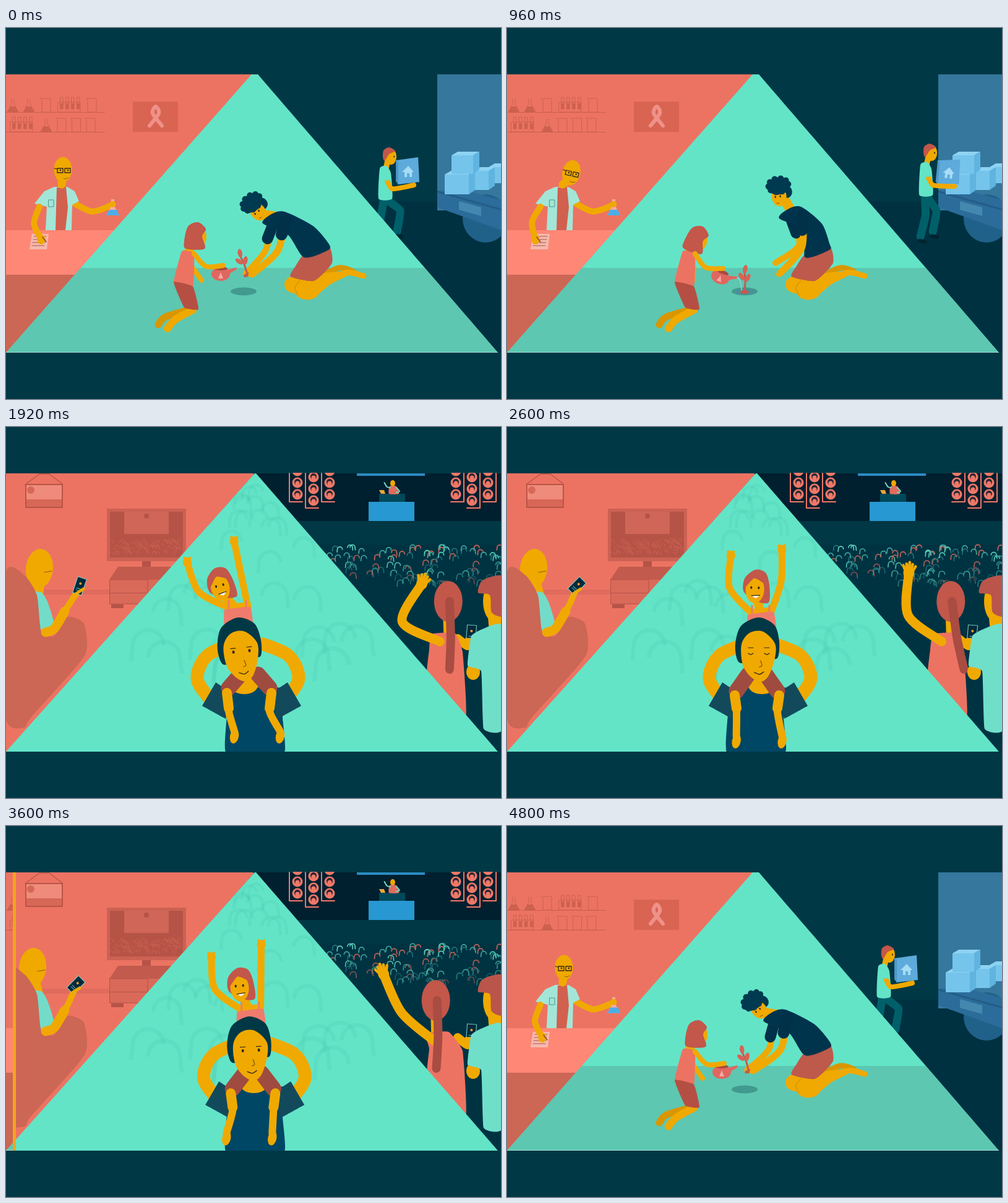
Write an HTML page with a canvas that moves like this. It is 800 px wide and 600 px high and loops after 4.84 s.

```html
<!DOCTYPE html>
<html lang="en">
<head>
<meta charset="utf-8">
<title>Two sides</title>
<style>
html, body { margin: 0; width: 100%; height: 100%; overflow: hidden; background: #003845; }
canvas { display: block; }
</style>
</head>
<body>
<canvas id="stage" width="800" height="600"></canvas>
<script>
const c = document.getElementById('stage').getContext('2d');
const LOOP = 4840, TURN = Math.PI * 2;
const SKIN = '#f0a900', SHADE = '#d99600', NIGHT = '#003845', CORAL = '#ec7362', ROSE = '#cc6655',
  HAIR = '#c2574a', MINT = '#63e4c7', INK = '#33291f', LINE = '#cd604f', NAVY = '#003148', CURLS = '#003a50';

// Timing
const mix = (a, b, u) => a + (b - a) * u;
function smooth(t, from, to) {
  const u = Math.max(0, Math.min(1, (t - from) / (to - from)));
  return u * u * (3 - 2 * u);
}
function random(seed) {
  return () => (seed = (seed * 16807) % 2147483647) / 2147483647;
}

// Drawing: points are flat x, y lists, k sets how round the curve is
function trace(p, closed, k) {
  const n = p.length / 2;
  const at = i => {
    i = closed ? (i + n) % n : Math.max(0, Math.min(n - 1, i));
    return [p[2 * i], p[2 * i + 1]];
  };
  c.beginPath();
  c.moveTo(p[0], p[1]);
  for (let i = 0; i < (closed ? n : n - 1); i++) {
    const [a, b, d, e] = [at(i - 1), at(i), at(i + 1), at(i + 2)];
    c.bezierCurveTo(b[0] + (d[0] - a[0]) * k, b[1] + (d[1] - a[1]) * k,
      d[0] - (e[0] - b[0]) * k, d[1] - (e[1] - b[1]) * k, d[0], d[1]);
  }
  if (closed) c.closePath();
}
function fill(color, p, k = 0) { trace(p, true, k); c.fillStyle = color; c.fill(); }
function line(color, w, p, k = 0.15) {
  trace(p, false, k);
  c.strokeStyle = color; c.lineWidth = w; c.lineCap = c.lineJoin = 'round';
  c.stroke();
}
function rect(color, x, y, w, h) { c.fillStyle = color; c.fillRect(x, y, w, h); }
function frame(color, x, y, w, h, lw = 1) { c.strokeStyle = color; c.lineWidth = lw; c.strokeRect(x, y, w, h); }
function ell(color, x, y, rx, ry = rx, r = 0) {
  c.beginPath(); c.ellipse(x, y, rx, ry, r, 0, TURN); c.fillStyle = color; c.fill();
}
function place(x, y, r, draw) { c.save(); c.translate(x, y); c.rotate(r); draw(); c.restore(); }
function mirror(x, draw) {
  for (const side of [1, -1]) { c.save(); c.translate(x, 0); c.scale(side, 1); draw(side); c.restore(); }
}
function clip(p, draw) { c.save(); trace(p, true, 0); c.clip(); draw(); c.restore(); }
function hook(color, w, x, y, r, side) {
  c.beginPath();
  c.arc(x, y, r, Math.PI, TURN);
  c.moveTo(x + side * r, y); c.lineTo(x + side * r * 1.1, y + r);
  c.strokeStyle = color; c.lineWidth = w; c.stroke();
}
// Arm of fixed length: the elbow bends out to one side as the hand comes nearer.
function arm(w, ax, ay, bx, by, length, side) {
  const dx = bx - ax, dy = by - ay, d = Math.hypot(dx, dy);
  const h = side * Math.sqrt(Math.max(0, length * length - d * d)) / 2 / d;
  const ex = (ax + bx) / 2 - dy * h, ey = (ay + by) / 2 + dx * h;
  line(SKIN, w, [ax, ay, ex, ey, bx, by]);
  return [ex, ey];
}

const LEFT = [0, 73, 404, 73, 0, 527], RIGHT = [402, 73, 800, 73, 800, 525, 793, 525];
const triangle = (color, x0, x1) => fill(color, [x0, 75, x1, 75, 795, 525, 0, 525]);

// ---------- Lab, planting, loading ----------

function flask(x, y) {
  line(LINE, 1, [x - 2, y - 21, x - 2, y - 13, x - 9, y, x + 9, y, x + 2, y - 13, x + 2, y - 21], 0);
  fill(LINE, [x - 9, y, x - 4, y - 9, x + 4, y - 9, x + 9, y]);
}
function beaker(x, y) {
  line(LINE, 1, [x - 9, y - 22, x - 7, y - 19, x - 7, y, x + 7, y, x + 7, y - 22, x - 9, y - 22], 0);
}
function rack(x, y) {
  for (let i = 0; i < 4; i++) {
    frame(LINE, x + i * 9, y - 24, 4, 19);
    rect(LINE, x + i * 9, y - 14, 4, 9);
  }
  frame(LINE, x - 4, y - 16, 36, 16);
}

function lab(t) {
  rect(CORAL, 0, 75, 400, 255);
  for (const y of [136, 168]) rect(LINE, 0, y, 160, 1);
  flask(11, 136); flask(37, 136); beaker(65, 136); rack(88, 136); beaker(139, 136);
  rack(11, 168); flask(65, 168);
  for (let i = 0; i < 3; i++) beaker(90 + i * 23.5, 168);
  rect('#d96452', 205, 119, 73, 49);
  line('#ef9189', 6, [232, 158, 247, 138, 242, 127, 237, 138, 252, 158]);

  rect('#ff8775', 0, 327, 400, 72);
  rect(ROSE, 0, 399, 400, 126);
  fill('#f5b9ad', [42, 333, 69, 333, 66, 358, 38, 358]);
  for (let i = 0; i < 4; i++) line('#a85248', 1, [45 - i, 337 + i * 5, 65 - i, 337 + i * 5]);

  const lower = smooth(t, -600, 0), look = smooth(t, 100, 960);
  const hx = 92 + 12 * look, hy = 229 + 5 * look;
  const lx = 60 - 3 * lower - 11 * look, ly = 342;
  const rx = mix(179, 172, lower), ry = mix(259, 286, lower);
  arm(10, 108, 282, rx, ry, 69, 1);
  fill('#a3e6d7', [78, 257, 62, 264, 46, 284, 66, 289, 64, 327, 106, 327, 107, 286, 118, 280, 111, 264, 99, 257]);
  fill('#d2604f', [82, 258, 97, 257, 100, 290, 96, 327, 80, 327]);
  frame('#4f948b', 69, 278, 8, 11);
  line(SKIN, 13, [90, 253, hx, hy + 8]);
  place(hx, hy, 0.22 * look, () => {
    ell(SKIN, 0, 0, 14.5, 20.5);
    for (const x of [-9, 3]) { frame(INK, x, -2, 9, 7, 1.3); ell(INK, x + 5, 1, 1.3); }
    line(INK, 1.2, [-14, -2, -9, -1]);
    line('#8a5b10', 1, [1, 14, 5, 15, 9, 13]);
  });
  place(rx, ry, -0.8 * (1 - lower), () => {
    fill('#f6aaa0', [-2, -9, 3, -9, 3, 2, 11, 17, -10, 17, -2, 2]);
    fill('#4aaeea', [-5, 8, 7, 8, 11, 17, -10, 17]);
  });
  ell(SKIN, rx, ry - 1, 5.5, 5);
  arm(10, 54, 289, lx, ly, 57, 1);
  ell(SKIN, lx, ly, 6.5, 8);
  line('#8e433b', 1.5, [lx + 2, ly - 4, lx + 8, ly + 4]);
}

function girlWatering(t) {
  const lift = smooth(t, -600, -40), pour = smooth(t, 400, 960);
  const hx = 295 + 11 * lift, hy = 337 + 5 * pour, sx = 280 + 4 * lift, wx = 267 + 4 * lift;
  const kx = mix(334, 347, lift) - 2 * pour, ky = mix(411, 397, lift) + 5 * pour;
  line(SHADE, 11, [302, 454, 258, 467, 246, 480]);
  line(SKIN, 12, [302, 456, 273, 472, 261, 486]);
  line(SKIN, 8, [sx + 18, 388, mix(sx + 32, sx + 16, pour), 408]);
  line(SKIN, 14, [sx + 10, 364, hx - 5, hy + 10]);
  fill(CORAL, [sx, 361, sx + 20, 364, wx + 31, 418, wx, 412], 0.05);
  fill('#b54f43', [wx, 411, wx + 31, 418, 311, 455, 288, 452], 0.06);
  place(hx, hy, 0.3 * pour, () => {
    ell(SKIN, 10, 1, 8, 14);
    fill(HAIR, [-18, 8, -12, -16, 4, -23, 17, -12, 11, 0, 15, 20, -15, 20], 0.15);
  });
  place(kx, ky, 0.38 * pour, () => {
    fill('#df6760', [10, 3, 26, -7, 25, -10, 8, -5]);
    ell('#df6760', 0, 1, 15, 11);
    ell('#a94840', 0, -8, 11, 3);
    fill('#f6aaa5', [-4, 8, 0, -2, 4, 8]);
  });
  arm(8, sx + 20, 365, kx + 4, ky - 13, 56, 1);
}

function planter(t) {
  const plant = smooth(t, -450, 600), rise = smooth(t, 500, 960);
  const dip = smooth(t, 0, 450) * (1 - rise);
  const px = mix(395, 384, plant), py = mix(382, 428, plant);
  const nx = mix(440, 465, rise) - 6 * dip, ny = mix(302, 294, rise) + 8 * dip;
  const angle = mix(-1.17, -0.62, rise), hx = nx + 45 * Math.sin(angle), hy = ny - 45 * Math.cos(angle);
  const fx = mix(px - 3, 434, rise), fy = mix(py - 3, 380, rise);
  const gx = mix(px + 7, 441, rise), gy = mix(py - 2, 397, rise);

  ell('#429a8f', 384, 426, 21, 6.5);
  if (t > 640) {
    ell('#4b8f9d', 384, 427, 15, 4);
    line('#8fd5dc', 1.5, [371, 403, 377, 409, 379, 424]);
  }
  line(SHADE, 9, [505, 403, 538, 388, 560, 393]);
  line(SKIN, 9, [505, 418, 548, 396, 578, 401]);
  fill(SKIN, [480, 404, 535, 394, 552, 400, 525, 414, 492, 438], 0.1);
  ell(SKIN, 467, 415, 17, 14);
  ell(SKIN, 487, 423, 21, 16.5);
  line(SHADE, 1.5, [472, 432, 467, 420, 475, 408]);
  fill('#bd5a4c', [482, 366, 521, 352, 527, 380, 498, 409, 460, 402, 468, 385], 0.1);

  const [ex, ey] = arm(10, nx - 10, ny + 10, fx, fy, 98, -1);
  line(NAVY, 18, [nx - 7, ny + 12, mix(nx - 10, ex, 0.7), mix(ny + 10, ey, 0.6)]);
  line(SKIN, 16, [nx - 5, ny + 3, hx + 7, hy + 16]);
  fill('#00344d', [nx - 25, ny + 14, nx - 11, ny - 1, nx + 10, ny - 5, (nx + 520) / 2 + 16, (ny + 352) / 2 - 7,
    521, 348, 521, 359, 482, 371, nx + 16, ny + 33], 0.13);
  place(px, py, -0.38 * Math.sin(Math.PI * plant), () => {
    line('#c65a4c', 3, [0, 0, 1, -20, -1, -40]);
    for (const [x, y, r] of [[1, -38, 0.2], [-5, -26, -0.6], [5, -24, 0.5]]) ell('#d66455', x, y, 3.6, 7, r);
    ell('#c65a4c', 0, -1, 7, 3);
  });
  const [kx, ky] = arm(11, nx + 12, ny + 5, gx, gy, 111, -1);
  ell(SKIN, gx, gy, 7, 4, -0.5);
  line(NAVY, 19, [nx + 13, ny + 8, mix(nx + 12, kx, 0.5), mix(ny + 5, ky, 0.5)]);
  place(hx, hy, angle + 0.5, () => {
    ell(CURLS, 12, 9, 9, 10);
    ell(SKIN, -1, 15, 12, 16);
    ell(CURLS, 0, -2, 19, 14);
    for (let a = 0; a < TURN; a += 0.63) ell(CURLS, 16 * Math.cos(a), 11 * Math.sin(a) - 3, 5);
    for (const x of [-7, 1]) ell(INK, x, 15, 1.2, 1.8);
    line('#8a5b10', 1, [-6, 25, -2, 26]);
  });
}

function cube(x, y, w, h) {
  const d = 10;
  fill('#8ed3f2', [x, y, x + d, y - 6, x + w + d, y - 6, x + w, y]);
  fill('#5fb4e0', [x + w, y, x + w + d, y - 6, x + w + d, y + h - 7, x + w, y + h]);
  rect('#75c4ec', x, y, w, h);
}

function loading(t) {
  rect(NIGHT, 400, 75, 400, 450);
  rect('#003141', 400, 281, 400, 244);
  rect('#35779d', 697, 75, 103, 220);
  ell('#20618a', 775, 308, 37, 39);
  fill('#2b6c9a', [697, 263, 740, 262, 800, 278, 800, 327, 697, 290]);
  fill('#235c86', [697, 263, 800, 292, 800, 295, 697, 266]);
  fill('#4488b0', [732, 280, 768, 290, 768, 304, 732, 294]);
  cube(780, 225, 24, 26); cube(756, 231, 24, 31); cube(709, 237, 39, 32); cube(720, 206, 35, 30);

  // Walks to the truck, then leans in to put the box down.
  const walk = Math.min(t, 600), set = smooth(t, 500, 960);
  const stride = Math.cos(walk / 190) * mix(1, 0.55, set);
  const bx = 30, by = 25 + 8 * set;
  place(619 + walk * 0.102 + 3 * set, 207 - 6 * set, 0, () => {
    for (const s of [-stride, stride]) {
      const up = Math.max(0, s) * 14;
      line('#00606a', 13, [-8, 68, 2 + s * 16, 102 - up, -5 + s * 18, 136 - up], 0.06);
      line('#00252f', 6, [-6 + s * 18, 143 - up, 2 + s * 18, 145 - up]);
    }
    line(SKIN, 9, [-5, 20, -2, 6]);
    fill(MINT, [-15, 20, -4, 16, 3, 28, 5, 69, -17, 69], 0.08);
    ell(SKIN, 3, 1, 9, 13);
    fill(HAIR, [-10, 2, -9, -9, 0, -14, 10, -8, 0, -3, -7, 8], 0.12);
    ell(INK, 8, 1, 1, 1.4);
    place(bx, by, 0.1 * set, () => {
      fill('#5daadb', [-19, -18, 17, -23, 19, 17, -16, 21]);
      fill('#4d97c8', [-19, -18, -15, -15, -15, 21, -19, 16]);
      fill('#a6dcf5', [-9, 1, 1, -9, 10, 1, 7, 1, 7, 9, -5, 9, -5, 1]);
      rect('#5daadb', -1, 3, 4, 6);
    });
    line(SKIN, 8, [-6, 32, 5, 53, bx + 10, by + 22], 0.1);
    line(MINT, 12, [-8, 26, -4, 34]);
  });
}

function sceneOne(t) {
  clip(LEFT, () => lab(t));
  clip(RIGHT, () => loading(t));
  triangle(MINT, 397, 407);
  clip([0, 388, 800, 388, 800, 525, 0, 525], () => triangle('#5dc7b1', 397, 407));
  rect('#9fe0d2', 0, 524, 795, 1);
  planter(t);
  girlWatering(t);
}

// ---------- Sofa, shoulders, concert ----------

function phone(x, y, r) {
  place(x, y, r, () => {
    rect('#7fd8cf', -8, -14, 16, 28);
    rect('#042a3a', -7, -13, 14, 26);
    ell('#f0a030', 0, -4, 2);
    for (const line of [4, 7]) rect('#69bcc4', -4, line, 8, 1);
  });
}

function livingRoom(t) {
  rect(CORAL, 0, 75, 400, 450);
  line('#b95447', 1.3, [31, 93, 54, 76, 70, 76, 91, 92], 0);
  rect('#ef8b7b', 32, 94, 59, 36);
  ell('#d76757', 40, 102, 6);
  rect('#d76757', 33, 117, 58, 12);
  frame('#b95447', 32, 93, 59, 37, 2);
  rect('#df6c5c', 45, 263, 165, 8);

  rect('#cc6253', 163, 132, 128, 85);
  rect('#b65347', 168, 137, 118, 74);
  rect('#d06657', 191, 137, 72, 36);
  ell('#b65347', 227, 144, 4);
  const rnd = random(31);
  for (let i = 0; i < 80; i++) hook('#c65f51', 1, 170 + rnd() * 114, 183 + rnd() * 24, 2.5, 1);
  rect('#b65347', 220, 217, 14, 16);
  rect('#b65347', 209, 232, 34, 5);
  fill('#c25b4d', [167, 247, 181, 226, 268, 226, 250, 247]);
  rect('#d96a59', 167, 247, 83, 40);
  frame('#b65347', 168, 247, 61, 39);
  rect('#b65347', 168, 268, 61, 1);
  rect('#b65347', 170, 287, 20, 6);

  const look = smooth(t, 1920, 2600), hx = 54 - 11 * look, hy = 229;
  const px = 119 - 6 * look, py = 257;
  line(SKIN, 24, [hx - 3, hy + 12, 48, 272]);
  ell(SKIN, hx, hy, 22, 32, 0.1);
  line('#8a5b10', 1.2, [hx + 8, hy + 6, hx + 20, hy + 4]);
  fill('#72dcc8', [44, 270, 58, 268, 68, 285, 78, 322, 58, 332], 0.1);
  fill(ROSE, [0, 236, 30, 240, 50, 272, 57, 332, 78, 338, 100, 307, 126, 318, 127, 370, 40, 470, 30, 486, 0, 470], 0.1);
  line(SKIN, 15, [64, 332, 78, 326, 95, 298]);
  line(SKIN, 10, [78, 326, 98, 293, px - 2, py + 7]);
  phone(px, py, 0.32 + 0.46 * look);
  line(SKIN, 5, [px - 5, py + 12, px + 6, py + 5]);
}

function speakers(x) {
  mirror(x, () => {
    for (let i = 0; i < 3; i++) {
      const cx = -154 + i * 26 + 0, low = i === 1 ? 10 : 0;
      line('#ef7868', 2, [cx - 13, 75, cx - 13, 121 + low, cx + 8, 121 + low], 0);
      for (let j = 0; j < 3; j++) {
        const cy = 71 + low + j * 19;
        ell('#ef7868', cx, cy, 8.5);
        ell('#2b2733', cx, cy - 1, 5);
        ell('#ef7868', cx, cy + 1, 3.5);
      }
    }
  });
}

function concert(t) {
  rect('#001f2f', 400, 75, 400, 78);
  rect(NIGHT, 400, 152, 400, 40);
  rect('#003342', 400, 190, 400, 335);
  rect('#2c8cc4', 567, 75, 110, 4);
  speakers(625);
  rect('#2898d2', 586, 121, 74, 31);
  rect('#00495a', 603, 108, 42, 13);
  fill('#e6a63a', [603, 102, 611, 102, 613, 108, 606, 108]);
  fill('#df6c5d', [620, 96, 631, 96, 635, 108, 619, 108], 0.1);
  ell(SKIN, 625, 91, 4, 5);
  line('#70d9c5', 2, [621, 98, 616, 97, 613 + 3 * Math.sin(t / 160), 90]);
  line('#70d9c5', 2, [631, 98, 636, 104, 631, 106]);

  const rnd = random(77), tones = ['#5bcfba', '#41a99e', '#c9665a', '#23747a'];
  for (let i = 0; i < 105; i++) {
    const depth = rnd(), bob = Math.sin(t / 130 + i * 2);
    c.globalAlpha = 1 - 0.6 * depth * depth;
    hook(tones[i % 4], 1.7, 520 + rnd() * 280, 194 + depth * 60 + bob, 4 + depth, i % 3 ? -1 : 1);
  }
  c.globalAlpha = 1;

  // One slow swing moves head, hand and ponytail, each a little later than the other.
  const swing = (t - 1920) / 3300 * TURN;
  const hx = 705 + 14 * Math.cos(swing - 0.8), hy = 282, ax = 350 + hx / 2 - 6;
  const wx = 641 + 31 * Math.cos(swing), wy = 246 - 15 * Math.cos(swing - 2.1);
  line(SKIN, 17, [hx, hy + 20, hx + 1, 336]);
  line(SKIN, 14, [730, 342, 746, 354, 752, 346]);
  fill(CORAL, [ax - 14, 335, ax + 24, 333, 738, 364, 743, 472, 680, 420, 684, 360], 0.06);
  arm(15, ax, 347, wx, wy, 138, -1);
  place(wx, wy, 0.35 * Math.cos(swing), () => {
    ell(SKIN, 0, 0, 9, 10);
    for (let i = -2; i < 3; i++) line(SKIN, 4.5, [i * 3, -3, i * 5, -17 + Math.abs(i) * 3]);
  });
  ell(HAIR, hx, hy, 23, 33);
  const flick = Math.sin(swing);
  line('#a94c42', 14, [hx + 2, hy, hx + 4 + 6 * flick, 340, hx + 2 + 20 * flick, 392]);

  phone(752, 334, 0.08);
  line(SKIN, 6, [744, 344, 756, 346]);
  line(SKIN, 25, [790, 290, 793, 325]);
  ell(SKIN, 788, 282, 17, 32);
  fill('#b9554a', [763, 268, 768, 250, 785, 242, 805, 244, 805, 304, 785, 300, 782, 272], 0.12);
  ell(SKIN, 755, 396, 11, 13);
  fill('#70dfca', [752, 338, 772, 326, 802, 322, 802, 489, 772, 488, 768, 395, 746, 386], 0.06);
}

function haze() {
  const rnd = random(12);
  c.globalAlpha = 0.11;
  for (let i = 0; i < 32; i++) {
    const y = 105 + rnd() * 290, half = (y - 85) * 0.72, r = 11 + (y - 100) * 0.055;
    hook('#2fa898', 3 + r / 7, 402 + (rnd() * 2 - 1) * half, y, r, i % 2 ? 1 : -1);
  }
  c.globalAlpha = 1;
}

function child(x, y, tilt, bx, by) {
  const turnX = (u, v) => x + u * Math.cos(tilt) - v * Math.sin(tilt);
  const turnY = (u, v) => y + u * Math.sin(tilt) + v * Math.cos(tilt);
  for (const [side, u, v] of [[-1, -43, -49], [1, 39, -62]]) {
    const wx = turnX(u, v), wy = turnY(u, v);
    arm(11, bx + side * 17, by - 10, wx, wy, 103, side);
    ell(SKIN, wx, wy, 7, 8);
    for (const d of [-3, 3]) line(SKIN, 4, [wx + d, wy, wx + d * 1.5, wy - 7]);
  }
  line(SKIN, 14, [x, y + 12, bx, by - 6]);
  fill(SKIN, [bx - 20, by - 14, bx + 19, by - 18, bx + 20, by, bx - 20, by]);
  fill('#ef7b6c', [bx - 21, by - 5, bx + 21, by - 10, bx + 25, by + 24, bx - 20, by + 28], 0.04);
  for (const d of [-14, 14]) line('#ef7b6c', 3, [bx + d, by - 20, bx + d, by]);
  place(x, y, tilt, () => {
    fill(HAIR, [-20, 8, -19, -14, -3, -28, 14, -24, 21, -4, 21, 24, 0, 22], 0.15);
    ell(SKIN, -2, 4, 15, 22);
    fill(HAIR, [-19, 2, -17, -16, 0, -26, 15, -18, 18, 10, 12, -6, -4, -14], 0.1);
    for (const d of [-8, 4]) ell(INK, d, 1, 1.6, 2.2);
    fill('#fff3ea', [-6, 14, 5, 13, 0, 18], 0.12);
    line(INK, 1.2, [-7, 14, 6, 13]);
  });
}

function shoulders(t) {
  const sway = (1 - Math.cos((t - 1920) / 1320 * TURN)) / 2;
  const kick = 19 * smooth(t, 1920, 3300) - 13;
  const mx = 379 + 27 * sway, my = 358, dx = 18 * sway;
  child(347 + 56 * sway, 255 + 4 * sway, 0.3 * sway - 0.26, 374 + 36 * sway, 301 + 8 * sway);

  mirror(391 + dx, () => line(SKIN, 21, [-65, 436, -82, 406, -66, 370, -24, 351], 0.17));
  fill('#004765', [355, 525, 357, 465, 350 + dx / 2, 422, 448 + dx / 2, 422, 447, 470, 450, 525], 0.04);
  mirror(397 + dx / 2, () => fill('#124a5c', [-58, 413, -80, 451, -42, 472, -32, 430]));
  ell(SKIN, mx + 6, 418, 22, 14);
  mirror(393 + 11 * sway, side => {
    const foot = 37 - side * kick, drop = 498 + 8 * sway;
    line('#a04b40', 25, [14, my + 42, 33, 422 + 5 * sway]);
    line(SKIN, 16, [36, 430 + 4 * sway, 33, 455]);
    line(SKIN, 12, [35, 432, 33, 460, foot, drop - 6]);
    ell(SKIN, foot, drop + 2, 7, 12, 0.2 * side);
  });
  place(mx, my, 0.1 * sway - 0.1, () => {
    fill(NIGHT, [-33, 20, -37, -6, -28, -36, 0, -50, 26, -38, 34, -12, 32, 14, 20, 18, -20, 24], 0.15);
    fill(SKIN, [-27, -6, -14, -25, 8, -27, 27, -8, 27, 16, 17, 44, 4, 54, -12, 46, -25, 26], 0.16);
    const closed = t > 2420 && t < 2920;
    for (const x of [-12, 14]) {
      if (closed) line(INK, 1.3, [x - 4, 8, x, 10, x + 4, 8]);
      else ell(INK, x, 5, 2, 2.6);
      line(INK, 1.2, [x - 4, -1, x + 4, -1]);
    }
    line('#8a5b10', 1.4, [4, 20, 6, 28, 2, 30]);
    line(INK, 1.4, [-6, 39, 2, 42, 9, 38]);
  });
}

function sceneTwo(t) {
  clip(LEFT, () => livingRoom(t));
  clip(RIGHT, () => concert(t));
  triangle(MINT, 402, 404);
  haze();
  shoulders(t);
}

// ---------- Slider between the scenes ----------

const glide = (t, from) => (1 - Math.cos(Math.PI * Math.max(0, Math.min(1, (t - from) / 735)))) / 2;

function side(x, w, draw) {
  if (w > 0) clip([x, 74, x + w, 74, x + w, 525, x, 525], draw);
}
function draw(now) {
  const t = now % LOOP, x = 805 - 810 * (glide(t, 1120) - glide(t, 3530));
  rect(NIGHT, 0, 0, 800, 600);
  side(0, Math.min(800, x), () => sceneOne(t > LOOP / 2 ? t - LOOP : t));
  side(Math.max(0, x), 800 - x, () => sceneTwo(t));
  rect('#f2a51f', x - 2.5, 75, 5, 450);
}
const start = performance.now();
function tick() {
  draw(performance.now() - start);
  requestAnimationFrame(tick);
}
tick();
</script>
</body>
</html>
```
